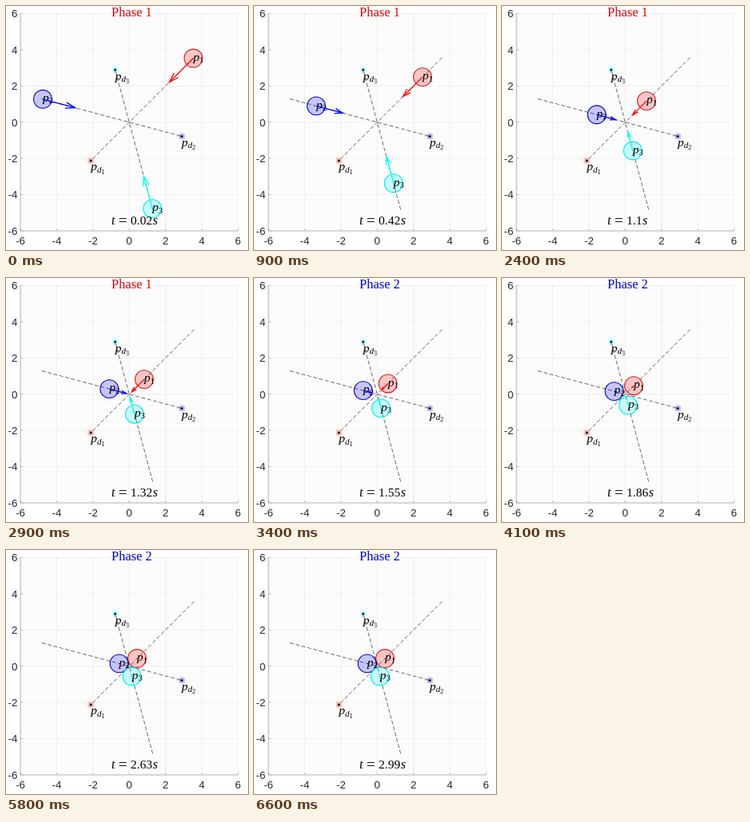
An HTML page with a canvas that plays this animation: 303x306 px, repeating every 6.7 s.

```html
<!DOCTYPE html>
<html lang="en">
<head>
<meta charset="utf-8">
<title>Three agents meeting</title>
<style>
html, body { margin: 0; width: 100%; height: 100%; overflow: hidden; background: #fff; }
canvas { display: block; }
</style>
</head>
<body>
<canvas id="stage" width="303" height="306"></canvas>
<script>
const g = document.getElementById('stage').getContext('2d');
const UNIT = 22.7, CX = 154.3, CY = 145.8;
const SERIF = '"Liberation Serif", "Times New Roman", serif';
const SANS = '"Liberation Sans", Arial, sans-serif';
const X = x => CX + x * UNIT;
const Y = y => CY - y * UNIT;

const GOAL = 3, RATE = 0.5, GAMMA = 5, T_SWITCH = 1.327;
const agents = [
  { angle: 45, start: 5.06, rgb: '255,0,0', edge: '#d81818' },
  { angle: 165, start: 5, rgb: '0,0,255', edge: '#0000c4' },
  { angle: 285, start: 5, rgb: '0,255,255', edge: '#00e6ee' }
].map(a => {
  const rad = a.angle * Math.PI / 180;
  return { ...a, ux: Math.cos(rad), uy: Math.sin(rad) };
});

// Distance from the centre and inward speed: free approach, then a safety barrier.
function motion(start, t) {
  const free = s => (start + GOAL) * Math.exp(-RATE * s) - GOAL;
  if (t < T_SWITCH) return { r: free(t), v: RATE * (free(t) + GOAL) };
  const base = (5 + GOAL) * Math.exp(-RATE * T_SWITCH) - GOAL;
  const h = (3 * base * base - 1) * Math.exp(-GAMMA * (t - T_SWITCH));
  const r = Math.sqrt((1 + h) / 3);
  return { r: r + free(T_SWITCH) - base, v: GAMMA * h / (6 * r) };
}

function line(points, color, width, dash = []) {
  g.strokeStyle = color;
  g.lineWidth = width;
  g.setLineDash(dash);
  g.beginPath();
  points.forEach(([x, y]) => g.lineTo(x, y));
  g.stroke();
  g.setLineDash([]);
}

function disc(x, y, r, fill, edge) {
  g.beginPath();
  g.arc(x, y, r, 0, 7);
  g.fillStyle = fill;
  g.fill();
  if (!edge) return;
  g.strokeStyle = edge;
  g.lineWidth = 1.1;
  g.stroke();
}

// Draws text and returns the x where it ends.
function text(s, x, y, size, { color = '#000', style = '', family = SERIF, align = 'left' } = {}) {
  g.font = `${style} ${size}px ${family}`;
  g.fillStyle = color;
  g.textAlign = align;
  g.fillText(s, x, y);
  return x + g.measureText(s).width;
}

function arrow(x, y, dx, dy, color) {
  const tx = x + dx, ty = y + dy, back = 0.29, side = 0.09;
  line([[x, y], [tx, ty]], color, 1.3);
  line([
    [tx - dx * back - dy * side, ty - dy * back + dx * side],
    [tx, ty],
    [tx - dx * back + dy * side, ty - dy * back - dx * side]
  ], color, 1.3);
}

function drawAxes() {
  g.fillStyle = '#fff';
  g.fillRect(0, 0, 303, 306);
  g.fillStyle = '#fcfcfc';
  g.fillRect(X(-6), Y(6), 12 * UNIT, 12 * UNIT);
  const opt = { color: '#262626', family: SANS };
  for (let k = -6; k <= 6; k += 2) {
    line([[X(k), Y(-6)], [X(k), Y(6)]], '#ececec', 0.8);
    line([[X(-6), Y(k)], [X(6), Y(k)]], '#ececec', 0.8);
    line([[X(k), Y(-6)], [X(k), Y(-6) - 3]], '#999', 0.6);
    line([[X(-6), Y(k)], [X(-6) + 3, Y(k)]], '#999', 0.6);
    text(k, X(k), 299, 13.3, { ...opt, align: 'center' });
    text(k, 14.3, Y(k) + 4.8, 13.3, { ...opt, align: 'right' });
  }
  line([[X(-6), Y(6)], [X(-6), Y(-6)], [X(6), Y(-6)]], '#999', 0.7);
}

function draw(t) {
  drawAxes();
  const italic = { style: 'italic' };

  agents.forEach(({ ux, uy, start, rgb }, i) => {
    const gx = X(-GOAL * ux), gy = Y(-GOAL * uy);
    line([[X(start * ux), Y(start * uy)], [gx, gy]], '#444', 0.8, [5, 2.6]);
    disc(gx, gy, 4, `rgba(${rgb},.25)`);
    disc(gx, gy, 1.5, '#000');
    let x = text('p', gx, gy + 12.5, 15.5, italic);
    x = text('d', x, gy + 15, 11, italic);
    text(i + 1, x, gy + 17, 8);
  });

  const poses = agents.map(a => {
    const { r, v } = motion(a.start, t);
    return { ...a, v, x: X(r * a.ux), y: Y(r * a.uy) };
  });
  poses.forEach(p => disc(p.x, p.y, 11.4, `rgba(${p.rgb},.21)`, p.edge));
  poses.forEach((p, i) => {
    const end = text('p', p.x, p.y + 3.3, 15.5, italic);
    text(i + 1, end, p.y + 5.5, 10.5);
    const len = p.v * 10.6;
    arrow(p.x, p.y, -len * p.ux, len * p.uy, `rgb(${p.rgb})`);
  });

  const second = t >= T_SWITCH;
  text(second ? 'Phase 2' : 'Phase 1', 132, 13, 16.5, { color: second ? '#0000d0' : '#e60000' });

  text('t', 132, 274, 16, italic);
  text('=', 141, 275, 19);
  const end = text(Math.round(t * 100 + 1e-6) / 100, 156, 274, 15.5);
  text('s', end + 0.5, 274, 16, italic);
}

const STEP = 100, STEPS = 67;
const begin = performance.now();
function tick() {
  const i = Math.floor(Math.max(0, performance.now() - begin) / STEP) % STEPS;
  draw(0.015 + 0.045 * i);
  requestAnimationFrame(tick);
}
tick();
</script>
</body>
</html>
```
